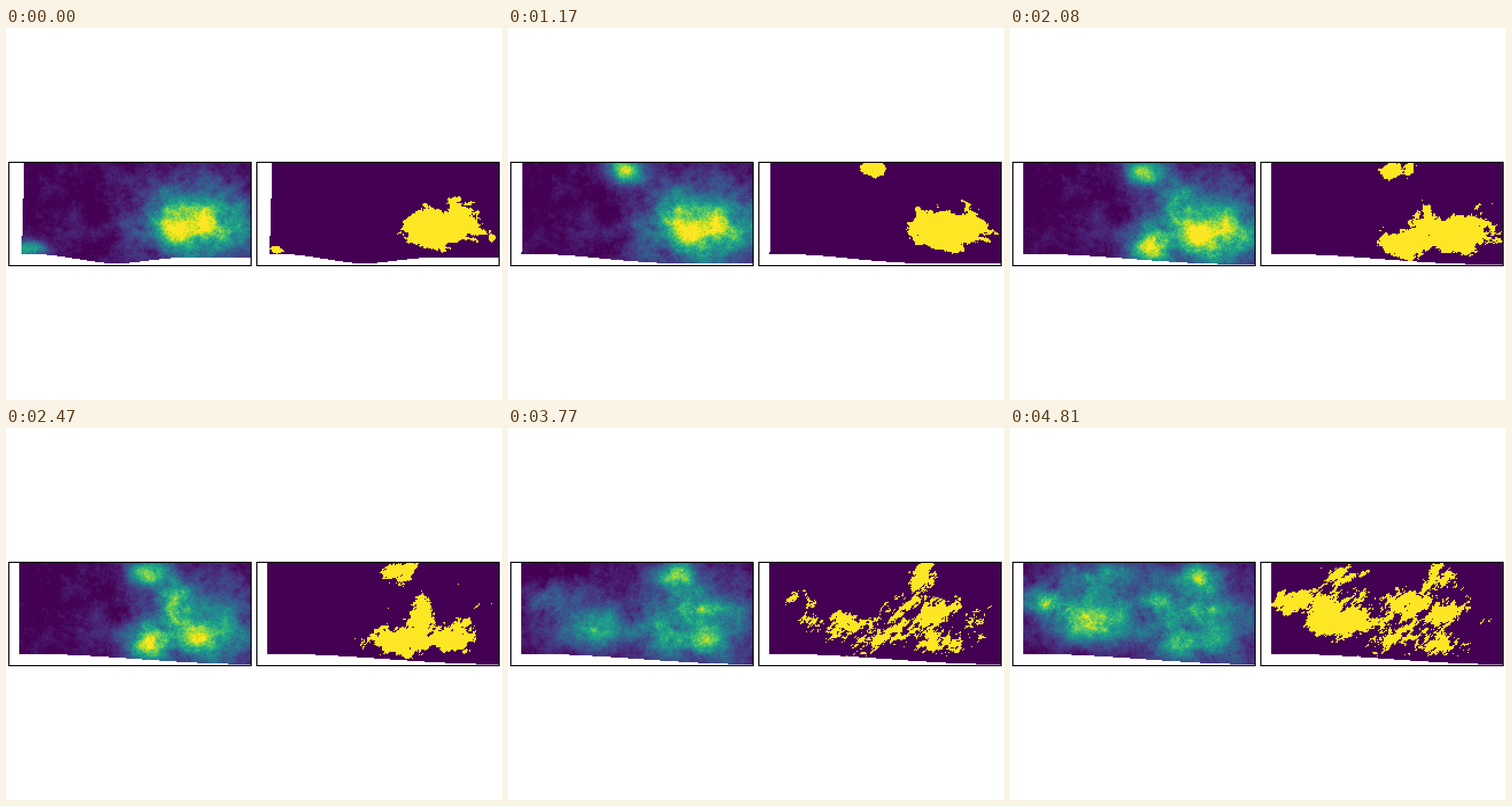
Recreate the animation shown at these times as a matplotlib script. Size 864x648 px, loop 4.94 s.

```python
import numpy as np
import matplotlib.pyplot as plt
from matplotlib.animation import FuncAnimation

W, H, DPI = 864, 648, 144
CELL, NX, NY = 2, 211, 90
BW, BH = NX * CELL, NY * CELL
LEFT, RIGHT, TOP = 5, 437, 234
FRAMES, STEP = 38, 130
FADE = 6
ALWAYS = (-99, 99)

X, Y = np.meshgrid(LEFT + CELL * (np.arange(NX) + 0.5),
                   TOP + CELL * (np.arange(NY) + 0.5))


def smooth(u):
    u = np.clip(u, 0, 1)
    return u * u * (3 - 2 * u)


def mass(life, start, stop, size, amount):
    """Rain mass that drifts from start to stop and fades at both ends."""
    t0, t1 = life

    def density(i):
        x, y = np.array(start) + (np.array(stop) - start) * (i - t0) / (t1 - t0)
        fade = smooth((i - t0) / FADE) * smooth((t1 - i) / FADE)
        r2 = ((X - x) / size[0]) ** 2 + ((Y - y) / size[1]) ** 2
        return amount * fade * np.exp(-r2)
    return density


MASSES = [
    # eastern storm and the haze around it
    mass(ALWAYS, (370, 335), (310, 335), (110, 80), 0.45),
    mass((-9, 21), (320, 335), (365, 362), (76, 40), 0.88),
    mass((-9, 18), (305, 348), (280, 315), (30, 28), 0.5),
    mass((-9, 5), (42, 386), (42, 386), (28, 14), 0.7),
    # plume from the north, the stem below it and the southern cell
    mass((2, 47), (175, 243), (375, 265), (33, 24), 0.75),
    mass((13, 31), (285, 315), (305, 305), (24, 38), 0.75),
    mass((8, 31), (238, 396), (262, 350), (40, 27), 0.9),
    # lingering bands in the east
    mass((12, 47), (355, 366), (295, 380), (52, 20), 0.55),
    mass((20, 47), (345, 315), (310, 320), (55, 14), 0.5),
    # western system that closes the loop
    mass((26, 47), (78, 292), (52, 312), (38, 21), 0.72),
    mass((26, 47), (152, 356), (118, 322), (44, 31), 0.72),
    mass((28, 47), (230, 332), (285, 270), (27, 15), 0.55),
    mass((26, 47), (130, 345), (150, 285), (120, 55), 0.42),
    mass((32, 47), (150, 250), (160, 262), (80, 22), 0.4),
]


def noise(seed, power, deg=0, stretch=1):
    """Periodic fractal noise with unit spread, stretched along deg."""
    rng = np.random.default_rng(seed)
    fy, fx = np.meshgrid(np.fft.fftfreq(NY), np.fft.fftfreq(NX), indexing="ij")
    c, s = np.cos(np.radians(deg)), np.sin(np.radians(deg))
    f = np.hypot((fx * c + fy * s) * stretch, fy * c - fx * s)
    f = np.maximum(f, 0.02)
    n = np.fft.ifft2(np.fft.fft2(rng.standard_normal((NY, NX))) * f ** -power).real
    return (n - n.mean()) / n.std()


grain = noise(3, 0.5, -30, 1.4)
cloud = noise(8, 1.5)
ragged = noise(21, 1.4, 20, 1.3)
streaks = noise(34, 1.25, -38, 2.2)


def outside(i):
    """Cells beyond the swath: its left edge and its lower rim."""
    turn = min(i / 19, 1)
    edge = 22.5 + (9.5 - (Y - TOP) / 32) * np.exp(-i / 8)
    rim = 393.5 + 18 * smooth((X - 40) / (170 + 210 * turn))
    rim -= 12 * np.exp(-i / 4) * smooth((X - 170) / 150)
    return (X < edge) | (Y > rim)


def fields(i):
    clear = np.ones((NY, NX))
    for density in MASSES:
        clear *= 1 - density(i)
    base = 1 - clear

    soft, fine = np.roll(cloud, i, 1), np.roll(grain, i, 1)
    rate = base * (1 + 0.1 * soft + 0.05 * fine) + 0.03 * soft + 0.012 * fine

    # rain breaks up into diagonal streaks as the loop goes on
    late = smooth((i - 10) / 15)
    rough = np.roll(ragged * np.sqrt(1 - late) + streaks * np.sqrt(late), i, 1)
    wet = base + (0.1 + 0.05 * late) * rough > 0.6 - 0.1 * late

    hidden = outside(i)
    return [np.ma.array(np.clip(f, 0, 1), mask=hidden) for f in (rate, wet * 1.0)]


plt.rcParams["axes.linewidth"] = 1
fig = plt.figure(figsize=(W / DPI, H / DPI), dpi=DPI, facecolor="white")
images = []
for x0, data in zip((LEFT, RIGHT), fields(0)):
    ax = fig.add_axes([x0 / W, 1 - (TOP + BH) / H, BW / W, BH / H])
    ax.set(xticks=[], yticks=[])
    images.append(ax.imshow(data, cmap="viridis", vmin=0, vmax=1,
                            interpolation="nearest", aspect="auto"))


def update(i):
    for image, data in zip(images, fields(i)):
        image.set_data(data)
    return images


anim = FuncAnimation(fig, update, frames=FRAMES, interval=STEP,
                     repeat=True, repeat_delay=0, blit=False)
plt.show()
```
